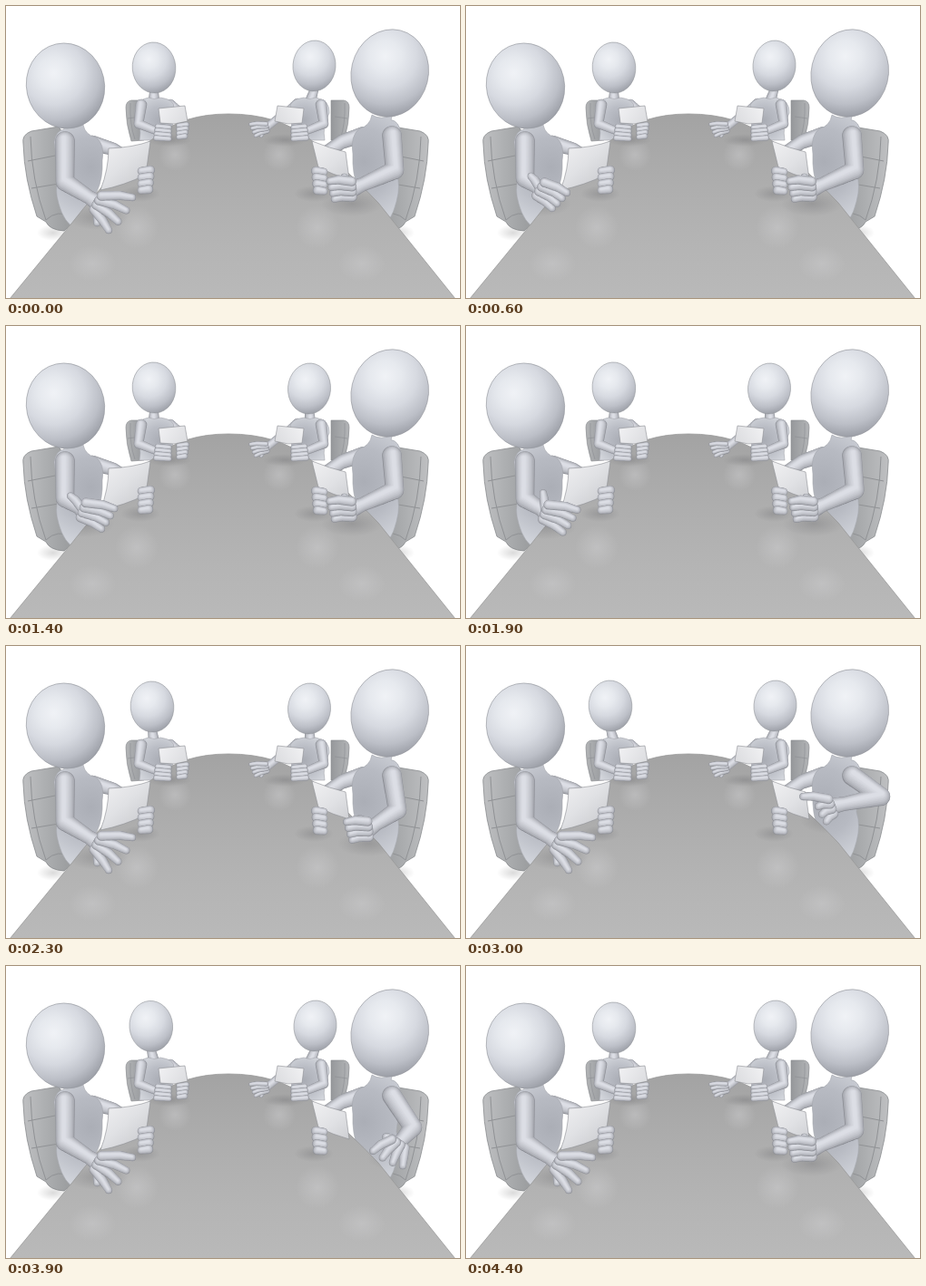
Write an HTML page with a canvas that moves like this. It is 500x322 px and loops after 4900 ms.

```html
<!DOCTYPE html>
<html lang="en">
<head>
<meta charset="utf-8">
<title>Meeting</title>
<style>
html, body { margin: 0; width: 100%; height: 100%; overflow: hidden; background: #fff; }
canvas { display: block; }
</style>
</head>
<body>
<canvas id="stage" width="500" height="322"></canvas>
<script>
const ctx = document.getElementById('stage').getContext('2d');
const LOOP = 4900, STEP = 100, LAST = 4400;
const mix = (a, b, k) => a + (b - a) * k;

// Eases from one state to the next; keys are [time, state].
function pose(keys, t) {
  const i = keys.findIndex(k => k[0] > t);
  if (i < 0) return keys[keys.length - 1][1];
  if (i === 0) return keys[0][1];
  const [t0, a] = keys[i - 1], [t1, b] = keys[i];
  const u = (t - t0) / (t1 - t0), k = u * u * (3 - 2 * u);
  return a.map((v, j) => mix(v, b[j], k));
}

// Draws the left-hand version of something on the right of the table.
function flip(sum, draw, stretch = 1) {
  ctx.save();
  ctx.transform(-1, 0, 0, stretch, sum, 240 * (1 - stretch));
  draw();
  ctx.restore();
}

function radial(x, y, r, ...colors) {
  const g = ctx.createRadialGradient(x, y, 0, x, y, r);
  colors.forEach((c, i) => g.addColorStop(i / (colors.length - 1), c));
  return g;
}

function ramp(x0, y0, x1, y1, ...colors) {
  const g = ctx.createLinearGradient(x0, y0, x1, y1);
  colors.forEach((c, i) => g.addColorStop(i / (colors.length - 1), c));
  return g;
}

function shape(d, fill, line = '#8b8d92', width = .6) {
  const p = new Path2D(d);
  if (fill) {
    ctx.fillStyle = fill;
    ctx.fill(p);
  }
  ctx.strokeStyle = line;
  ctx.lineWidth = width;
  ctx.stroke(p);
}

function spot(x, y, rx, ry, rgb, alpha) {
  ctx.save();
  ctx.translate(x, y);
  ctx.scale(rx, ry);
  ctx.fillStyle = radial(0, 0, 1, `rgba(${rgb},${alpha})`, `rgba(${rgb},0)`);
  ctx.fillRect(-1, -1, 2, 2);
  ctx.restore();
}

// Rounded limb through points [x, y, radius], shaded from rim to crest.
function tube(...pts) {
  const dots = [], layers = 8;
  for (let i = 1; i < pts.length; i++) {
    const a = pts[i - 1], b = pts[i], n = Math.ceil(Math.hypot(b[0] - a[0], b[1] - a[1])) || 1;
    for (let j = 0; j <= n; j++) dots.push(a.map((v, c) => mix(v, b[c], j / n)));
  }
  for (let k = 0; k < layers; k++) {
    const d = k / layers, tone = mix(140, 226, Math.sqrt(d));
    ctx.beginPath();
    for (const [x, y, r] of dots) {
      const size = k ? r * (1.1 - d) : r + .3, cx = x - r * d * .15, cy = y - r * d * .4;
      ctx.moveTo(cx + size, cy);
      ctx.arc(cx, cy, size, 0, 7);
    }
    ctx.fillStyle = `rgb(${tone},${tone + 2},${tone + 9})`;
    ctx.fill();
  }
}

function head(x, y, rx, ry, turn) {
  ctx.save();
  ctx.translate(x, y);
  ctx.rotate(turn);
  ctx.beginPath();
  ctx.ellipse(0, 0, rx, ry, 0, 0, 7);
  ctx.fillStyle = radial(-rx * .22, -ry * .35, ry * 1.45, '#f0f2f6', '#e6e9ee', '#d6d9e0', '#bcbfc7', '#94979f');
  ctx.fill();
  ctx.strokeStyle = '#94969c';
  ctx.lineWidth = .6;
  ctx.stroke();
  ctx.restore();
}

// Four fingers fanned around dir, and a thumb.
function hand(x, y, dir, spread, reach, curl, thumb, r = 5) {
  const finger = (bx, by, angle, len, w) => tube([bx, by, w],
    [bx + Math.cos(angle) * len * .6, by + Math.sin(angle) * len * .6 - w * .3, w * .95],
    [bx + Math.cos(angle) * len, by + Math.sin(angle) * len, w * .75]);
  finger(x, y, thumb, reach * .65, r);
  for (let i = 3; i >= 0; i--) {
    const off = (i - 1.5) * r * 1.15;
    finger(x - Math.sin(dir) * off, y + Math.cos(dir) * off, dir + (i - 1.5) * spread,
      reach * (1 - i * .06) * (i ? curl : 1), r);
  }
}

function grip(x0, x1, y, r) {
  for (let i = 0; i < 4; i++) tube([x0 - i * .6, y + i * r * 1.5, r], [x1, y + 1 + i * r * 1.5, r * .85]);
}

function arm(shoulder, ex, ey, px, py, ...fingers) {
  tube(shoulder, [ex, ey, 10], [mix(ex, px, .75), mix(ey, py, .75), 7.5], [px, py, 9]);
  hand(px, py, ...fingers);
}

// Elbow, palm, finger direction, spread, reach, curl, thumb direction.
const rest = [65, 194, 101, 217, .5, .3, 34, 1, 1.6];
const open = [65, 190, 82, 202, .55, .08, 27, 1, -2.2];
const offer = [65, 190, 85, 203, .35, .1, 32, 1, -2.3];
const leftKeys = [[0, rest], [500, open], [800, open], [1400, offer], [1800, offer], [2200, rest]];

// The right arm is posed in mirrored space.
const hold = [60, 181, 107, 202, .05, .04, 24, 1, -1];
const lift = [57, 181, 89, 202, .1, .05, 23, 1, -.9];
const point = [31, 166, 86, 177, .35, .3, 28, .5, -.6];
const palmUp = [40, 178, 56, 196, 1, .3, 24, 1, -.5];
const rightKeys = [[1800, hold], [2300, lift], [2800, point], [3200, point], [3700, palmUp], [3900, palmUp], [4300, hold]];

const backLeft = [[1800, [163, 68]], [2800, [159, 66]], [3700, [159, 66]], [4400, [163, 68]]];
const backRight = [[600, [339.5, 66]], [1300, [334, 69]], [2400, [334, 69]], [3000, [340.5, 66]]];

function backChair() {
  shape('M132 112Q132 105 138 104L152 104V148L138 149Q132 130 132 112Z', ramp(131, 0, 152, 0, '#b4b6b8', '#96989b'), '#85878a');
  shape('M134 124L148 122M137 107Q136 130 142 147', null);
}

function frontChair() {
  spot(52, 250, 18, 9, '110,110,110', .25);
  shape('M19 152Q17 142 28 138L58 133Q72 150 62 220L76 236L64 248Q48 247 44 238L34 232Q20 190 19 152Z',
    ramp(18, 0, 68, 0, '#bfc0c2', '#adafb1', '#9c9ea0'), '#8a8c8e', .8);
  shape('M24 171L54 165M28 201L58 196M27 144Q28 192 44 236Q56 224 74 232', null, '#909295', 1);
}

function backBody(neckX, inner) {
  tube(...inner);
  tube([neckX, 92, 4.5], [163, 106, 6]);
  shape('M157 101Q163 104 170 101Q186 103 185 113L182 148H147Q150 132 142 118Q141 104 157 101Z',
    radial(170, 126, 30, '#a9acb4', '#babdc5', '#d4d7dd'), '#a4a7ae');
}

function frontBody() {
  tube([95, 151, 8], [118, 158, 7], [148, 176, 6]);
  shape('M62 130Q75 137 85 131Q87 142 99 145Q109 152 106 170Q107 190 100 205L78 246Q64 240 58 218Q53 202 58 188L53 150Q55 137 64 136Z',
    radial(94, 178, 66, '#abaeb6', '#b7bac2', '#d2d5dc'), '#a4a7ae');
}

function table(leftPalm, rightPalm) {
  const top = 'M4 323L72 240Q125 172 165 144Q195 119 245 119Q300 119 335 147Q380 185 410 217L495 323Z';
  ctx.save();
  shape(top, ramp(0, 119, 0, 322, '#a3a3a3', '#aaa', '#b0b0b0', '#b5b5b5', '#b9b9b9'), '#9a9a9a', .8);
  ctx.clip(new Path2D(top));
  const sheen = () => {
    spot(95, 284, 26, 20, '212,212,214', .35);
    spot(144, 244, 24, 24, '212,212,214', .4);
    spot(186, 164, 18, 18, '212,212,214', .4);
    spot(180, 148, 24, 7, '100,100,103', .3);
    spot(148, 207, 22, 9, '100,100,103', .3);
  };
  sheen();
  flip(487, sheen);
  for (const [x, y] of [leftPalm, rightPalm]) spot(x, y + 16, 34, 14, '100,100,103', .3);
  ctx.restore();
}

function backArm() {
  shape('M168 113L197 110L200 127L185 130L170 129Z', ramp(168, 110, 200, 130, '#f2f2f4', '#dadbde'));
  tube([149, 109, 6], [146, 130, 5], [166, 138, 4]);
  grip(167, 180, 133, 2.8);
}

function sheet(d, x0, x1) {
  shape(d, ramp(x0, 152, x1, 198, '#efeff1', '#e0e1e4', '#cbccd0'));
}

function draw(t) {
  const left = pose(leftKeys, t), right = pose(rightKeys, t);
  const headL = pose(backLeft, t), headR = pose(backRight, t);
  ctx.fillStyle = '#fff';
  ctx.fillRect(0, 0, 500, 322);

  backChair();
  flip(510, backChair);
  frontChair();
  flip(484, frontChair);
  backBody(headL[0], [[181, 108, 5], [189, 114, 4], [196, 128, 4]]);
  flip(498, () => backBody(498 - headR[0], [[177, 107, 5], [193, 121, 4], [204, 130, 4]]));
  head(...headL, 23.8, 28, -.08);
  head(...headR, 23.5, 28, .08);
  frontBody();
  flip(488, frontBody, 1.1);
  head(65.5, 88, 43, 47.2, -.22);
  head(422.7, 74, 42.5, 48.5, .24);

  table([left[2], left[3]], [488 - right[2], right[3]]);
  backArm();
  grip(199, 190, 131, 2.8);
  flip(496, () => {
    tube([193, 121, 4], [208, 133, 4]);
    hand(209, 134, .2, .12, 17, 1, 1, 2.3);
    backArm();
  });

  sheet('M113 157Q140 156 159 149L154 186Q130 198 104 203Q113 180 113 157Z', 110, 150);
  grip(159, 149, 181, 4.7);
  arm([65, 149, 10.5], ...left);
  sheet('M337 149Q357 157 374 161L378 191Q360 186 344 178Z', 340, 376);
  flip(488, () => {
    grip(147, 138, 182, 4.7);
    arm([63, 143, 10.5], ...right);
  });
}

let shown = -1;
function tick() {
  const t = Math.min(LAST, Math.floor(performance.now() % LOOP / STEP) * STEP);
  if (t !== shown) draw(shown = t);
  requestAnimationFrame(tick);
}
tick();
</script>
</body>
</html>
```
